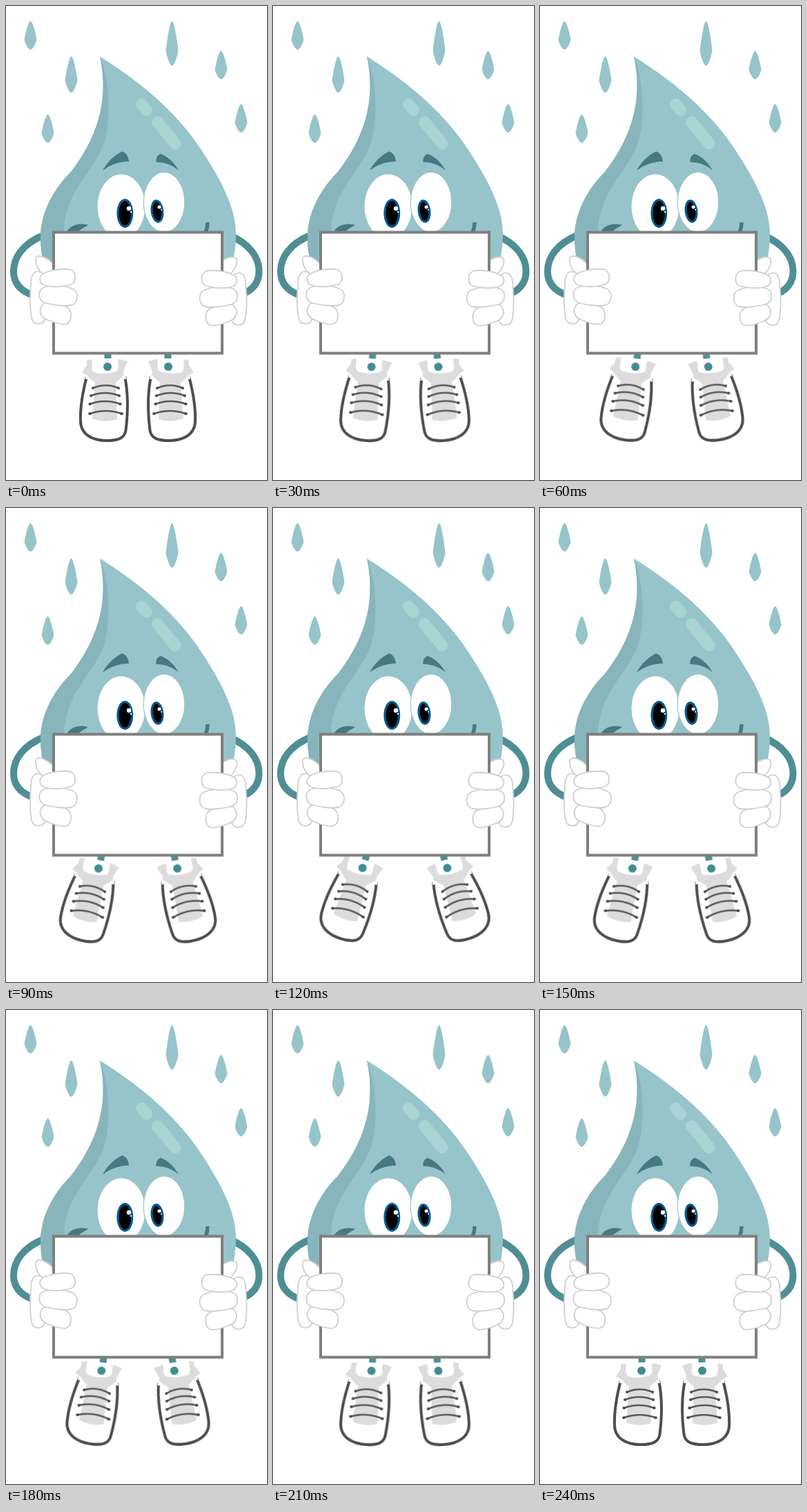
Recreate the animation shown at these times as an HTML page without scripts. Size 378 by 686 pixels, loop 0.3 s.

```html
<!DOCTYPE html>
<html lang="en">
<head>
<meta charset="utf-8">
<title>Dancing water drop</title>
<style>
  html, body { margin: 0; width: 100%; height: 100%; overflow: hidden; background: #fff; }
  svg { display: block; width: 100%; height: 100%; }

  .light { fill: #96c4ca; }
  .shade { fill: #87b5bb; }
  .deep { fill: #457a80; }
  .limb { fill: none; stroke: #508e95; stroke-width: 10; }
  .shine { stroke: #a9d4d3; stroke-width: 17; stroke-linecap: round; }
  .glove { fill: #fff; stroke: #cfcfcf; stroke-width: 1.8; stroke-linejoin: round; }
  .iris { fill: #000; stroke: #005a8f; stroke-width: 3.2; }
  .white { fill: #fff; }
  .grey { fill: #dcdcdc; }
  .sole { fill: #fff; stroke: #4d4d4f; stroke-width: 4; }
  .lace { fill: none; stroke: #58585a; stroke-width: 2.5; }
  .eyelet { fill: #4d4d4f; }

  /* Four hard steps out, four back, then a short rest */
  .swing { transform-origin: 147px 459px; animation: swing 300ms infinite; }
  @keyframes swing {
    0% { transform: translateY(0) rotate(0deg); animation-timing-function: steps(4, end); }
    40% { transform: translateY(1.4px) rotate(16deg); animation-timing-function: steps(4, end); }
    80%, 100% { transform: translateY(0) rotate(0deg); }
  }
</style>
</head>
<body>
<svg viewBox="0 0 378 686" xmlns="http://www.w3.org/2000/svg">
  <defs>
    <path id="rain" class="light" d="M0 0C3 0 7 16 9 27C7 34 3 41 0 41C-3 41-7 34-9 27C-7 16-3 0 0 0Z"/>

    <path id="arm" class="limb" d="M56 331C24 344 11 364 11 384C11 402 22 413 40 419"/>

    <g id="lace">
      <path class="lace" d="M-18.5 0Q0-8 18.5 0"/>
      <circle class="eyelet" cx="-18.5" r="2"/>
      <circle class="eyelet" cx="18.5" r="2"/>
    </g>

    <g id="leg">
      <path class="limb" d="M147.500 470V511"/>
      <path class="sole" d="M117 536C112 555 107 580 108 602C109 622 128 629 146 629C163 629 172 625 173.500 614C176.500 590 177 560 172 536"/>
      <path class="white" d="M117 511H169L174 540H115Z"/>
      <path class="grey" d="M129 543C139 537 150 537 159 543L161 598Q143 604 125 597Z"/>
      <path class="grey" d="M117 513L125 511H163L176 514L170 529L171 534L160 544H127L118 535L110 530L117 520Z"/>
      <path class="white" d="M124 510H163C160 518 165 522 161 528Q144 535 127 530C122 524 126 517 124 510Z"/>
      <circle cx="147" cy="522" r="6" fill="#3e8d93"/>
      <use href="#lace" x="144.500" y="553"/>
      <use href="#lace" transform="translate(143.500 564) scale(1.1 1)"/>
      <use href="#lace" transform="translate(143.500 576) scale(1.18 1)"/>
      <use href="#lace" transform="translate(144.500 590) scale(1.24 1)"/>
    </g>

    <g id="hand">
      <path class="glove" d="M52 386C39 380 36 392 36 405C34 424 35 440 37 452C40 463 54 462 57 452L64 400Z"/>
      <path class="glove" d="M54 431C46 440 49 451 62 455C72 459 82 462 88 460C95 457 96 444 91 438C80 430 66 428 54 431Z"/>
      <path class="glove" d="M55 407C46 411 46 424 55 429C67 433 86 435 95 433C105 430 106 413 96 409C84 404 68 403 55 407Z"/>
      <path class="glove" d="M53 388C47 393 48 401 56 404C68 408 85 406 94 403C103 399 102 384 92 381C80 380 62 382 53 388Z"/>
    </g>
  </defs>

  <use href="#rain" x="35.500" y="22"/>
  <use href="#rain" transform="translate(94.500 73) scale(1 1.28)"/>
  <use href="#rain" x="60.500" y="157"/>
  <use href="#rain" transform="translate(240.500 22) scale(1 1.57)"/>
  <use href="#rain" x="311.500" y="65"/>
  <use href="#rain" x="340.500" y="142"/>

  <use href="#arm"/>
  <use href="#arm" transform="translate(377.500) scale(-1 1)"/>

  <g class="swing"><use href="#leg"/></g>
  <g transform="translate(382) scale(-1 1)">
    <g class="swing"><use href="#leg"/></g>
  </g>

  <!-- Body -->
  <path class="light" d="M136 73C203 115 253 160 288 216C316 260 333 296 333 330C333 420 270 476 191 476C112 476 50 420 50 335C50 302 66 268 94 240C128 196 151 142 136 73Z"/>
  <path class="shade" d="M136 73C151 110 152 165 142 198C128 240 84 268 84 330V420C62 398 50 368 50 335C50 302 66 268 94 240C128 196 151 142 136 73Z"/>
  <path class="shine" d="M196.500 142.500L203.500 150.500M219.500 168L245 199"/>

  <!-- Face -->
  <path class="deep" d="M140 238C147 225 157 216 168 210.500C174 212 177 217 178 225C164 225 151 230 140 238Z"/>
  <path class="deep" d="M250 238C244 227 235 218 224 214C219 216 217 220 217.500 226C230 226 241 230 250 238Z"/>
  <path class="deep" d="M89 325C95 317 106 313 119 317C115 320 108 322 103 329H92Z"/>
  <path d="M292 313Q292 321 289 328" fill="none" stroke="#457a80" stroke-width="5.500"/>
  <ellipse class="white" cx="167" cy="290" rx="34.500" ry="46.500"/>
  <ellipse cx="229" cy="284" rx="29.800" ry="43.500" fill="#fff" stroke="#96c4ca" stroke-width="1.200"/>
  <ellipse class="iris" cx="172.300" cy="300" rx="10.300" ry="19.300"/>
  <circle class="white" cx="178" cy="293" r="3.200"/>
  <circle class="white" cx="181" cy="298" r="1.200"/>
  <ellipse class="iris" cx="219" cy="297" rx="7.800" ry="15.200" transform="rotate(-7 219 297)"/>
  <circle class="white" cx="222" cy="291" r="2.500"/>
  <circle class="white" cx="225" cy="295" r="1"/>

  <!-- Thumbs, sign, fingers -->
  <path class="glove" d="M72 378C65 368 54 361 46 362C40 365 43 378 52 387L72 400Z"/>
  <path class="glove" d="M308 372C317 365 326 362 332 364C337 368 334 378 326 387L308 400Z"/>
  <rect x="69" y="327.500" width="244" height="175" fill="#fff" stroke="#7f7f7f" stroke-width="4"/>
  <use href="#hand"/>
  <use href="#hand" transform="translate(383.500 2) scale(-1 1)"/>
</svg>
</body>
</html>
```
